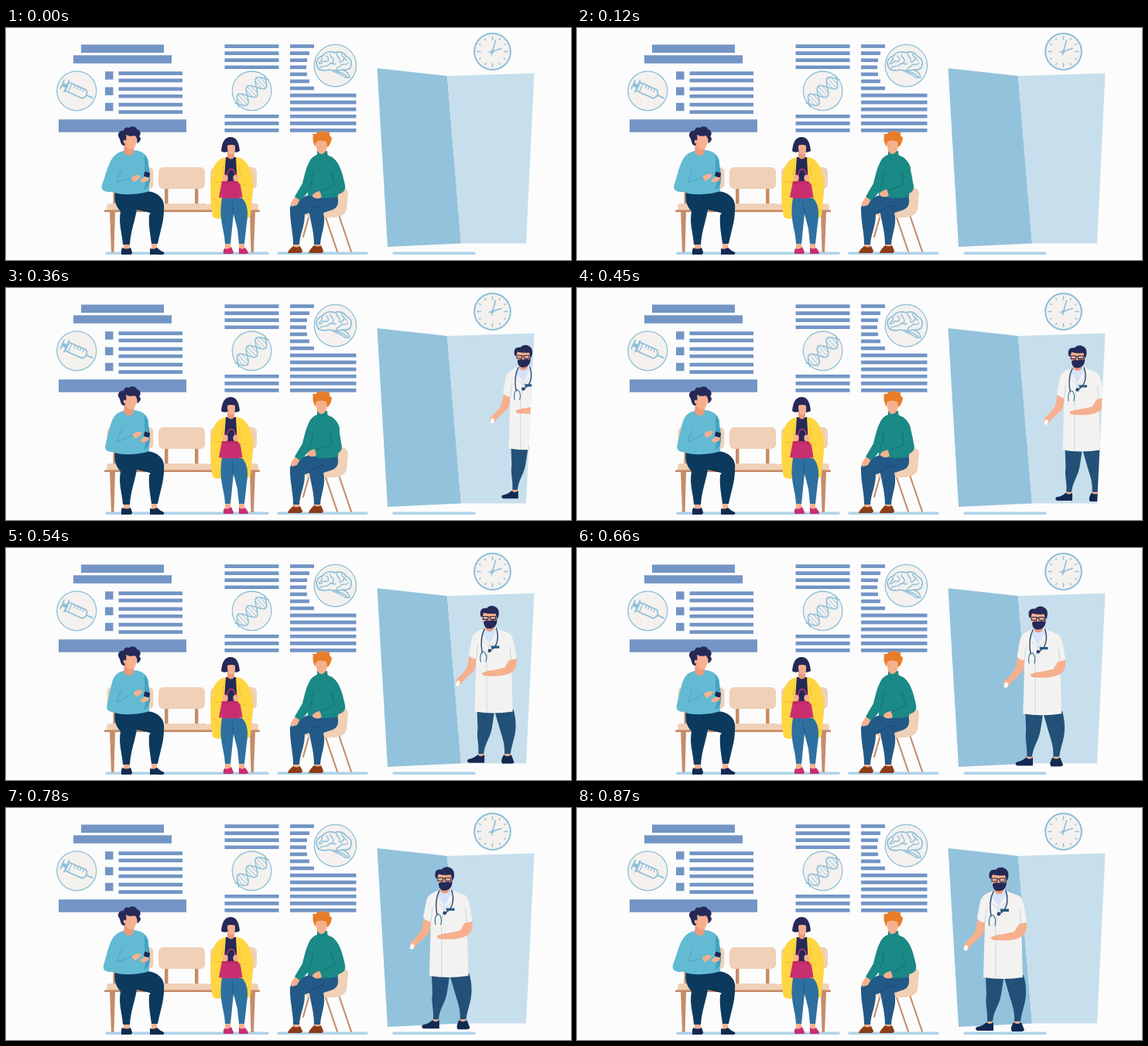
An HTML page with a canvas for the animation above (1650 ms loop, 730x300 px).

```html
<!DOCTYPE html>
<html lang="en">
<head>
<meta charset="utf-8">
<title>Waiting room</title>
<style>
html, body { margin: 0; width: 100%; height: 100%; overflow: hidden; background: #fcfcfc; }
canvas { display: block; }
</style>
</head>
<body>
<canvas id="stage" width="730" height="300"></canvas>
<script>
const ctx = document.getElementById('stage').getContext('2d');
const LOOP = 1650, WALK_END = 870, STEP = 30;
const C = {
  bg: '#fcfcfc', bar: '#7395c5', ring: '#8ebfd9', disc: '#f4f1ee', floor: '#aed3e9',
  seat: '#f0d0b6', wood: '#c68c69', skin: '#f6b08e', shade: '#e99b7b',
  hair: '#242958', navy: '#0b3a5e', shoe: '#122a52', sky: '#63bad3', skyDark: '#45a2c1',
  yellow: '#ffd541', gold: '#f0b92c', pink: '#c92f70', denim: '#2e70a0',
  orange: '#e87d29', teal: '#1b8986', tealDark: '#126e70', jeans: '#235986', brown: '#8c3c16',
  coat: '#f4f2f0', fold: '#b9d5e3', slacks: '#235077', scope: '#28456f'
};

function fill(d, color) {
  ctx.fillStyle = color;
  ctx.fill(new Path2D(d));
}

function line(d, color, width = 1) {
  ctx.strokeStyle = color;
  ctx.lineWidth = width;
  ctx.lineCap = ctx.lineJoin = 'round';
  ctx.stroke(new Path2D(d));
}

function rect(x, y, w, h, color, r = 0) {
  ctx.fillStyle = color;
  ctx.beginPath();
  ctx.roundRect(x, y, w, h, r);
  ctx.fill();
}

function oval(x, y, rx, ry, color) {
  ctx.fillStyle = color;
  ctx.beginPath();
  ctx.ellipse(x, y, rx, ry, 0, 0, 7);
  ctx.fill();
}

function disc(x, y, r, width = 1.3) {
  oval(x, y, r, r, C.disc);
  ctx.strokeStyle = C.ring;
  ctx.lineWidth = width;
  ctx.stroke();
}

function at(x, y, angle, draw) {
  ctx.save();
  ctx.translate(x, y);
  ctx.rotate(angle);
  draw();
  ctx.restore();
}

function drawBars() {
  const bar = (x, y, w, h = 4.7) => rect(x, y, w, h, C.bar);
  bar(97, 21.5, 107, 10.5);
  bar(87, 35.3, 127, 10.5);
  bar(68, 118.2, 165, 16.5);
  for (let i = 0; i < 3; i++) {
    const y = 56.2 + i * 20.3;
    bar(128, y, 10.5, 10.5);
    bar(145.5, y, 82.5);
    bar(145.5, y + 9.4, 82.5);
  }
  for (let i = 0; i < 13; i++) {
    const y = 21.2 + i * 9.07;
    if (i < 4 || i > 9) bar(282.5, y, 70);
    bar(367, y, i > 6 ? 85.5 : [21, 22, 25, 31][Math.abs(i - 3)]);
  }
}

function drawSyringe() {
  disc(91.3, 81.3, 25.5);
  at(91, 81, 0.42, () => {
    line('M-13-6H11L14-2V2L11 6H-13Z M-14-8V8 M-20 0H-14 M-20-6V6 M14 0H23', C.ring, 1.7);
    rect(-19, -2.5, 6, 5, C.ring);
    line('M-9-6V6 M-4-6V-2 M0-6V-2 M4-6V-2 M8-6V-2', C.ring, 1.2);
  });
}

function drawDna() {
  disc(317.6, 81.3, 25.3);
  at(317.6, 82, -0.74, () => {
    const wave = x => 9 * Math.cos(x * Math.PI / 16);
    for (const side of [-1, 1]) {
      ctx.beginPath();
      for (let x = -26; x <= 26; x++) ctx.lineTo(x, side * wave(x));
      ctx.lineWidth = 1.5;
      ctx.strokeStyle = C.ring;
      ctx.stroke();
    }
    for (let x = -20; x <= 20; x += 4) line(`M${x} ${wave(x)}V${-wave(x)}`, C.ring, 0.9);
  });
}

function drawBrain() {
  disc(425.4, 48.6, 27.2);
  line('M402 49C399 43 404 37 409 36C413 30 421 30 425 32C432 29 438 33 440 37C447 39 447 47 445 51C443 55 438 54 434 54C428 56 422 55 417 54C411 56 403 55 402 49Z', C.ring, 1.7);
  line('M404 46C409 48 408 41 413 43S417 38 414 36 M406 51C412 48 414 51 418 47S424 49 426 46 M419 34C419 39 424 38 423 43S418 44 418 47', C.ring, 1.4);
  line('M427 33C427 38 432 37 431 42S436 43 437 39 M427 54C427 50 432 51 433 48S439 50 442 45 M434 34C433 37 438 38 440 42 M408 38C410 42 405 42 405 45', C.ring, 1.4);
  line('M421 55C427 59 433 59 438 64H444C443 59 440 56 436 55 M426 56C432 57 438 59 441 64', C.ring, 1.5);
}

function drawClock() {
  disc(628.5, 30.5, 23.4, 2);
  at(628.5, 30.5, 0, () => {
    for (let i = 0; i < 12; i++) {
      line(i % 3 ? 'M0-19.5V-17.5' : 'M0-19.5V-15.5', C.ring, 1.4);
      ctx.rotate(Math.PI / 6);
    }
    line('M-1 4L4-14.5 M-4 1L11.5-4', C.ring, 1.6);
    oval(0, 0, 2, 2, C.ring);
  });
}

function drawRoom() {
  rect(0, 0, 730, 300, C.bg);
  drawBars();
  drawSyringe();
  drawDna();
  drawBrain();
  drawClock();
  line('M130 291.2H338 M352 291.2H466 M501 291.2H605', C.floor, 3.6);
  fill('M479.5 52L570 62L588 278.5L493 283Z', '#93c2dc');
  fill('M570 62L682.5 58.5L672 278.5L588 278.5Z', '#c7dfec');
}

function drawBench() {
  for (const x of [130.5, 197, 264]) {
    rect(x + 8, 205, 4.5, 24, C.wood);
    rect(x + 47, 205, 4.5, 24, C.wood);
    rect(x, 180, 60, 28, C.seat, 6);
  }
  for (const x of [130, 195, 260]) rect(x, 227, 66, 10, C.seat, 4);
  rect(127, 235.2, 201, 2.8, C.wood, 1);
  fill('M134 237H141L139.5 290H136Z M315 237H322L320 290H316.5Z', C.wood);
}

// sway: 0..1, elbow tucks in while the hand taps the phone
function drawPhoneMan(sway) {
  const e = sway * 7, hx = 167 + sway * 3, hy = 195 - sway * 7;
  fill('M152 277H160V287H152Z M188 276H195V287H188Z', C.skin);
  fill('M141 211H183C198 213 206 222 204 235C204 251 199 263 196 279H188C186 264 184 254 185 242L187 239L169 235C166 252 161 263 160 280H151C150 264 145 254 148 237C142 231 139 222 141 211Z', C.navy);
  line('M187 239C181 236 175 234 169 233', '#082c4b');
  fill('M150 284Q156 287 161 284L163 290Q163 293 160 293H149Q148 288 150 284Z M186 285Q191 287 195 284Q199 288 204 290Q205 293 202 293H186Z', C.shoe);
  fill('M152 159C146 160 141 164 140 172V213C154 217 173 215 185 211L184 171C181 162 174 159 167 158Z', C.sky);
  fill('M179 164C183 169 185 181 186 189C187 201 184 208 178 209L180 203L179 190Z', C.skyDark);
  fill('M153 147L166 146L165 158C165 168 154 166 152 160Z', C.shade);
  fill('M152 137C158 134 169 137 169 143C169 151 166 157 161 157C155 156 152 150 152 137Z', C.skin);
  fill('M145 140C144 134 150 132 152 133C153 128 157 128 159 129C163 126 169 128 169 131C174 132 175 138 172 140C176 143 173 148 169 149C170 144 169 141 166 139C161 141 157 139 155 138C156 144 155 149 153 152C147 152 149 145 145 140Z', C.hair);
  oval(153.5, 147, 1.8, 2.6, C.skin);
  fill('M173 198C176 193 181 191 185 193L184 197L178 200Z', C.skin);
  at(182, 189.5, 0.3, () => rect(-3.6, -3, 7.2, 6, '#1b2a52', 1));
  fill(`M${hx - 6} ${hy - 1}L${hx + 1} ${hy - 5}L${hx + 7} ${hy - 4}L${hx + 4} ${hy + 1}L${hx - 3} ${hy + 5}Z`, C.skin);
  fill(`M149 160C137 163 ${133 + e * .6} 176 ${129 + e * .7} 188L${124 + e} 203C${122 + e} 210 ${128 + e} 212 ${134 + e * .6} 212C146 212 155 205 ${hx - 2} ${hy + 4}L${hx - 6} ${hy - 2}C156 ${197 - e * .5} 149 197 143 199L150 177Z`, C.sky);
  line(`M${hx - 6} ${hy - 1}C156 ${197 - e * .5} 149 197 143 199L149 184`, C.skyDark, .9);
}

function drawWoman() {
  fill('M284 167C273 169 267 178 266 191C263 209 264 228 267 244Q273 249 281 245L302 244Q310 249 316 243C317 226 321 208 318 192C315 178 309 168 298 167Z', C.yellow);
  fill('M284 167H297L300 222H280Z', C.hair);
  fill('M283 276H290V286H283Z M301 276H308V286H301Z', C.skin);
  fill('M279 220H305C313 228 313 241 311 252L308 279H301L299 260L294 240L290 279H283C283 262 274 248 279 220Z', C.denim);
  line('M294 240L292 224', '#225a86');
  fill('M282 285Q287 287 291 283L294 290Q294 292 291 292H281Q280 288 282 285Z M301 284Q305 287 309 284L313 290Q313 292 310 292H301Z', C.pink);
  fill('M286 158H295V167Q291 172 286 167Z', C.shade);
  fill('M278 159C279 147 283 141 290 141C298 141 301 148 302 159Q297 162 294 160H286Q281 162 278 159Z', C.hair);
  fill('M286 152Q291 150 296 152V157C296 162 293 164 291 164C287 163 286 160 286 152Z', C.skin);
  line('M286 199V190C286 180 296 180 296 190V199', C.pink, 1.6);
  fill('M279 198H302L305.5 219Q290 222 275 219Z', C.pink);
  line('M279 200H302', '#a71f59');
  oval(283, 194, 3.6, 4.2, C.skin);
  oval(297, 194, 3.6, 4.2, C.skin);
  fill('M280 171C270 177 269 191 270 198Q276 202 281 197L279 192Z', C.yellow);
  fill('M302 171C312 177 315 194 308 202Q303 205 299 198L303 191Z', C.yellow);
  line('M279 190L281 179 M270 199Q276 201 281 197 M303 191L301 180 M310 202Q304 204 299 198', C.gold, .9);
}

// slide: 0..1, hand pulls back along the thigh
function drawTealMan(slide) {
  const x = -slide * 8, e = -slide * 5, y = -slide * 3;
  line('M393 238L384 270 M412 242L428 289 M429 239L446 289', C.wood, 2.1);
  fill('M427 208Q439 203 442 213L440 235Q437 244 424 245H391Q386 243 387 237L424 234Z', C.seat);
  fill('M371 276H379V286H371Z M398 276H406V286H398Z', C.skin);
  fill('M391 216H428C431 227 428 234 419 236L410 239C414 253 407 265 406 280H398C398 264 394 253 392 239L386 241C386 257 380 265 379 280H371C371 264 367 252 367 236C366 229 371 224 378 221Z', C.jeans);
  line('M392 239C395 233 400 231 409 230', '#174669');
  fill('M371 282Q375 285 380 282L383 288Q383 291 380 291H364Q364 288 371 282Z M398 281Q403 284 407 281L410 288Q410 291 407 291H391Q391 288 398 281Z', C.brown);
  fill('M404 163C395 166 391 171 390 181V216Q409 223 429 218L431 181C429 172 422 167 415 164Z', C.teal);
  fill('M402 159H415L416 168Q409 171 402 167Z', C.teal);
  fill('M401 146Q407 141 415 145V153C414 159 411 163 407 163C403 162 400 158 401 146Z', C.skin);
  fill('M398 150C395 142 398 140 396 137L401 137L402 134L406 135L410 132L413 135L418 135L418 139L421 142C420 148 418 153 415 154L414 147Q407 144 401 147L400 154Z', C.orange);
  fill('M375 216L381 220L376 229L369 231L368 226Z', C.skin);
  fill('M398 167C389 172 386 190 383 201L373 218L380 223C389 215 395 207 397 198Z', C.teal);
  line('M391 209C395 202 396 194 396 186', C.tealDark, .9);
  const hx = 402 + x, hy = 216 + y;
  fill(`M${hx - 6} ${hy}Q${hx - 2} ${hy - 5} ${hx + 5} ${hy - 5}L${hx + 7} ${hy + 2}Q${hx} ${hy + 7} ${hx - 6} ${hy + 2}Z`, C.skin);
  fill(`M420 166C431 173 ${435 + e} 188 ${438 + e} 203C${440 + e} 213 ${431 + e} 215 ${424 + e} 216L${hx + 6} ${hy + 3}L${hx + 4} ${hy - 4}L${425 + e} 203L419 185Z`, C.teal);
  line(`M${hx + 4} ${hy - 4}L${425 + e} 203L420 187`, C.tealDark, .9);
}

function drawDoctor(t) {
  const left = WALK_END - t, k = left / 510, s = 1 - 0.06 * k;
  ctx.save();
  ctx.clip(new Path2D('M0 0H685L672 278.5L671 300H0Z'));
  ctx.translate(545 + left * 0.242, 77 - 3 * k);
  ctx.scale(s, s);
  ctx.translate(-545, -77);

  fill('M530 272H537V281H530Z M565 272H573V281H565Z', C.skin);
  fill('M528 216H552C549 232 549 242 545 252C541 261 538 267 537 276H530C531 262 527 253 529 242Z M551 216H577C581 230 581 243 578 254C576 262 574 268 573 276H565C566 262 561 251 558 240Z', C.slacks);
  fill('M529 277Q533 281 538 277L538 288H517Q513 285 517 283Q524 282 529 277Z M564 277Q569 281 574 277L578 287Q577 289 574 289H562Q559 285 564 277Z', C.shoe);
  fill('M518 143L527 146Q527 160 523 165L511 176L505 183L499 181L500 176Q513 164 515 158Z', C.skin);
  at(502.5, 181, 0.3, () => rect(-2.3, -3.3, 4.6, 6.6, '#fff', 1));
  fill('M538 107C527 111 523 114 521 121L517 143Q521 148 527 148L525 219Q550 223 576 219L574 150L581 148C579 132 577 119 572 114L552 106Z', C.coat);
  fill('M538 107H552L554 110L545 128L537 116Z', '#d4e3fb');
  fill('M539 100H551V108Q545 115 539 108Z', C.shade);
  line('M545 128L541 150V219 M527 148L529 130 M574 150L572 131 M538 109L535 122L545 132L555 121L553 108', C.fold, .9);
  fill('M571 150L581 148C582 156 580 162 575 166C566 171 555 172 545 171L536 170L534 167L546 164L565 160Z', C.skin);
  line('M537 167L546 164 M537 170H545', C.shade, .8);

  fill('M535 86Q546 82 555 86V97C553 104 549 106 545 106C538 105 535 98 535 86Z', C.skin);
  fill('M533 91C531 82 535 79 541 80C546 74 555 77 557 83C558 88 557 92 555 95L553 87C547 88 541 87 537 86L535 92Z', C.hair);
  fill('M537 98Q541 95 545 97Q549 95 553 97L554 94L555 96C555 104 550 107.5 545 107.5C539 107.5 537 103 537 98Z', C.hair);
  line('M536 91H543V95H536Z M546 91H553V95H546Z M543 92H546', '#22264e', 1.1);

  line('M538 108C533 117 533 128 535 140 M554 107C558 118 556 131 547 136', C.scope, 1.4);
  line('M533 152C531 143 535 136 538 139S541 148 540 152', '#397596', 1.2);
  oval(545, 137, 2.4, 2.4, C.scope);
  rect(547, 130.5, 11, 3.4, '#285a83');
  ctx.restore();
}

function frame(now) {
  const t = Math.min(WALK_END, Math.floor(now % LOOP / STEP) * STEP);
  const sway = t < 570 ? t / 570 : (WALK_END - t) / 300;
  const slide = t < 540 ? Math.sin(Math.PI * t / 540) : 0;
  drawRoom();
  drawDoctor(t);
  drawBench();
  drawPhoneMan(sway);
  drawWoman();
  drawTealMan(slide);
}

const start = performance.now();
function tick() {
  frame(performance.now() - start);
  requestAnimationFrame(tick);
}
tick();
</script>
</body>
</html>
```
